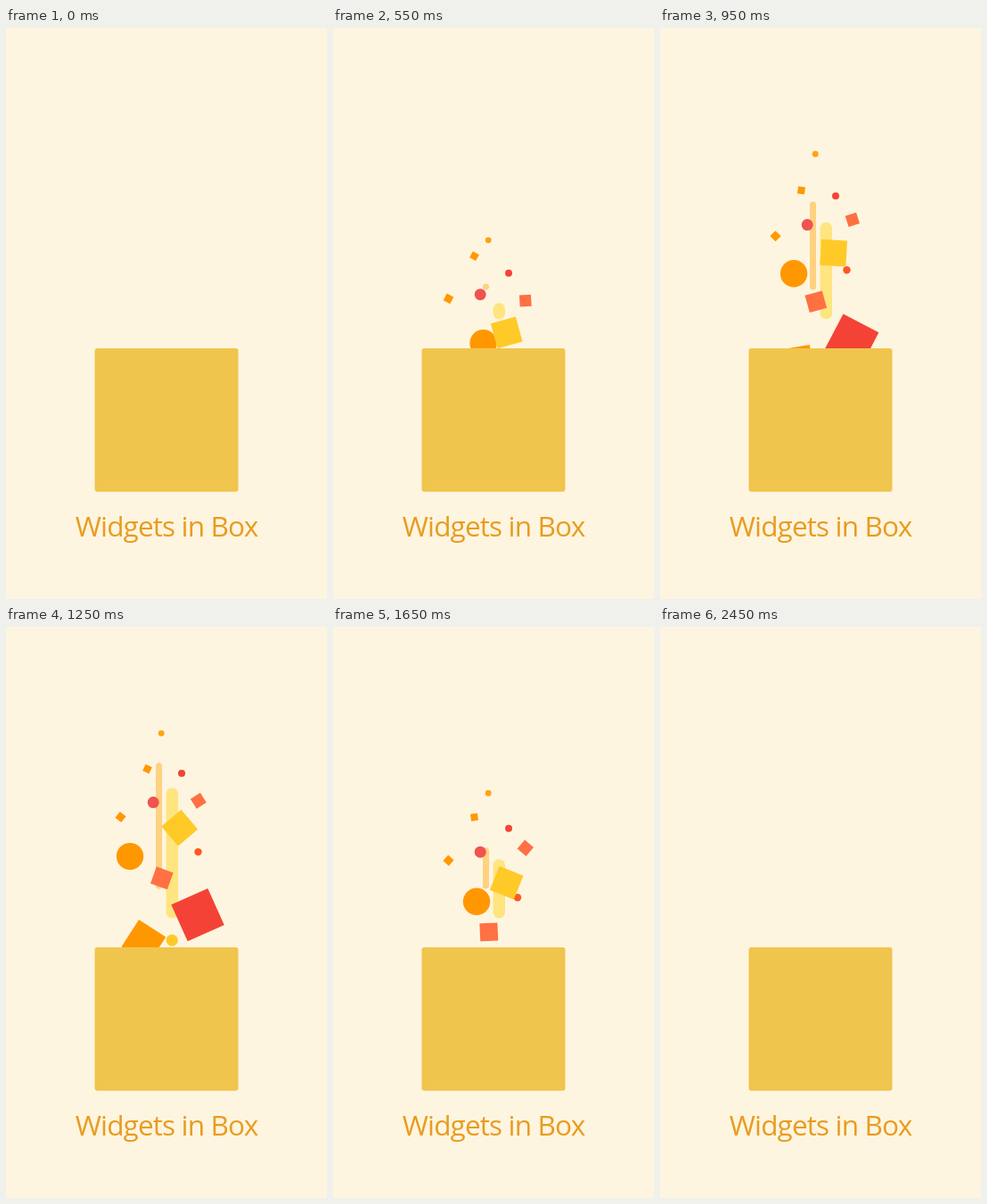
An HTML page that plays this animation: 360 px wide and 640 px high, repeating every 2500 ms.

```html
<!DOCTYPE html>
<html lang="en">
<head>
<meta charset="utf-8">
<title>Widgets in Box</title>
<style>
  html, body { margin: 0; width: 100%; height: 100%; overflow: hidden; background: #fef5e0; }
  svg { display: block; width: 100%; height: 100%; }
  text { font: 31.5px "Open Sans", "Noto Sans", sans-serif; letter-spacing: -0.85px; fill: #e89c20; text-anchor: middle; }
  #box { fill: #f0c54e; stroke: #f0c54e; stroke-width: 6; stroke-linejoin: round; }
</style>
</head>
<body>
<svg viewBox="0 0 360 640">
  <g id="items"></g>
  <path id="box"/>
  <text x="180" y="569.5">Widgets in Box</text>
</svg>
<script>
const LOOP = 2500, TURN = 1187, PEAK = 1.11;
const KNOTS = [-0.3, 0, 0.3, 0.7, 1, PEAK];
const LAUNCH = 150;

// Positions and angles are listed for progress 0, 0.3, 0.7 and 1.
const bar = (x, w, bottom, fill, y) => ({ type: 'line', x, w, bottom, fill, y });
const dot = (x, r, fill, y) => ({ type: 'circle', x, r, fill, y });
const tile = (x, size, fill, y, turn) => ({ type: 'rect', x, size, fill, y, turn });

const items = [
  bar(171.5, 7, 293.5, '#ffd180', [287, 247, 194, 152]),
  bar(186.3, 13.5, 326.5, '#ffe57f', [307.5, 260, 217.5, 180]),
  dot([204, 207, 209.5, 215.5], 4.2, '#ff5722', [342, 303, 271, 252]),
  dot([168.5, 161, 150, 139], 15.2, '#ff9800', [352.5, 307.5, 275, 257]),
  dot(174.2, 3.4, '#ffa310', [237, 186, 141, 119]),
  dot(197, 4, '#f44336', [274, 225.5, 188, 164]),
  dot(165.2, 6.5, '#ef5350', [298, 252, 220.3, 196.5]),
  dot(186.2, 6.6, '#ffca28', [440, 400, 372, 351]),
  tile(158.5, 8, '#ff9800', [255, 213, 181.8, 159], [30, 82, 98, 115]),
  tile([129.5, 129.5, 129.5, 128.5], 8.6, '#ff9800', [302.7, 261.5, 233, 213], [27, 42, 45, 38]),
  tile(215.8, 13, '#ff7043', [304.7, 247.5, 214.7, 194.7], [-4, -50, -108, -122]),
  tile([152, 152, 153, 154.4], 36, '#ff9800', [440, 410, 375.6, 352.8], [-130, -85, -9, 33]),
  tile(215, 45, '#f44336', [440, 398, 350.5, 322.5], [-80, -40, 28, 66]),
  tile(174.8, 20, '#ff7043', [395, 341.7, 306.5, 281.3], [-80, -2, 75, 110]),
  tile(194.7, 29, '#ffca28', [340.5, 286.5, 251.8, 225], [-15, 22, 94, 140])
];

// Monotone cubic through the knots, with one value added at each end.
function track(v, first) {
  if (!Array.isArray(v)) v = [v, v, v, v];
  const vals = [first ?? 2 * v[0] - v[1], ...v, v[3] + (v[3] - v[2]) * 0.17];
  const slopes = vals.slice(1).map((b, i) => (b - vals[i]) / (KNOTS[i + 1] - KNOTS[i]));
  const tangents = vals.map((_, i) => {
    const a = slopes[Math.max(i - 1, 0)], b = slopes[Math.min(i, 4)];
    return a * b > 0 ? 2 * a * b / (a + b) : 0;
  });
  return p => {
    let i = 0;
    while (i < 4 && p > KNOTS[i + 1]) i++;
    const h = KNOTS[i + 1] - KNOTS[i];
    const s = Math.max(0, Math.min(1, (p - KNOTS[i]) / h)), s2 = s * s, s3 = s2 * s;
    return vals[i] * (2 * s3 - 3 * s2 + 1) + vals[i + 1] * (3 * s2 - 2 * s3)
      + h * (tangents[i] * (s3 - 2 * s2 + s) + tangents[i + 1] * (s3 - s2));
  };
}

const set = (el, attrs) => { for (const k in attrs) el.setAttribute(k, attrs[k]); };
const layer = document.getElementById('items');
const box = document.getElementById('box');

for (const it of items) {
  it.el = document.createElementNS('http://www.w3.org/2000/svg', it.type);
  it.atX = track(it.x);
  it.atY = track(it.y, it.y[0] + LAUNCH);
  if (it.type === 'line') {
    it.atBottom = track(it.bottom, it.bottom + LAUNCH);
    set(it.el, { stroke: it.fill, 'stroke-width': it.w, 'stroke-linecap': 'round', x1: it.x, x2: it.x });
  } else if (it.type === 'circle') {
    set(it.el, { r: it.r, fill: it.fill });
  } else {
    it.atTurn = track(it.turn);
    set(it.el, { x: -it.size / 2, y: -it.size / 2, width: it.size, height: it.size, fill: it.fill });
  }
  layer.append(it.el);
}

function place(it, p) {
  const x = it.atX(p), y = it.atY(p);
  if (it.type === 'line') {
    const y2 = it.atBottom(p) - it.w / 2;
    set(it.el, { y1: Math.min(y + it.w / 2, y2 - 0.01), y2 });
  } else if (it.type === 'circle') {
    set(it.el, { cx: x, cy: y });
  } else {
    set(it.el, { transform: `translate(${x} ${y}) rotate(${it.atTurn(p)})` });
  }
}

// Squash first, then stretch; mirrored at the end of the loop.
function bulge(t) {
  const u = Math.min(t, 2450 - t);
  if (u <= 25 || u >= 550) return 0;
  return u < 285 ? -9.5 * Math.sin(Math.PI * (u - 25) / 260)
                 : 6.2 * Math.sin(Math.PI * (u - 285) / 265);
}

// The corners move in slightly as the sides bend in.
function drawBox(b) {
  const inset = 0.12 * b, k = 2 * b, cx = 180, cy = 439.3;
  const l = 102.5 + inset, r = 257.5 - inset, t = 362 + inset, m = 516.7 - inset;
  const in2 = k - 2 * inset, out = k + 2 * inset;
  set(box, { d: `M${l} ${t}Q${cx} ${t - out} ${r} ${t}Q${r - in2} ${cy} ${r} ${m}`
    + `Q${cx} ${m + out} ${l} ${m}Q${l + in2} ${cy} ${l} ${t}Z` });
}

function draw(t) {
  const p = PEAK - 0.00175 * Math.abs(t - TURN);
  layer.style.display = p > -0.3 ? '' : 'none';
  for (const it of items) place(it, p);
  drawBox(bulge(t));
}

const start = performance.now();
function tick() {
  draw((performance.now() - start) % LOOP);
  requestAnimationFrame(tick);
}
tick();
</script>
</body>
</html>
```
